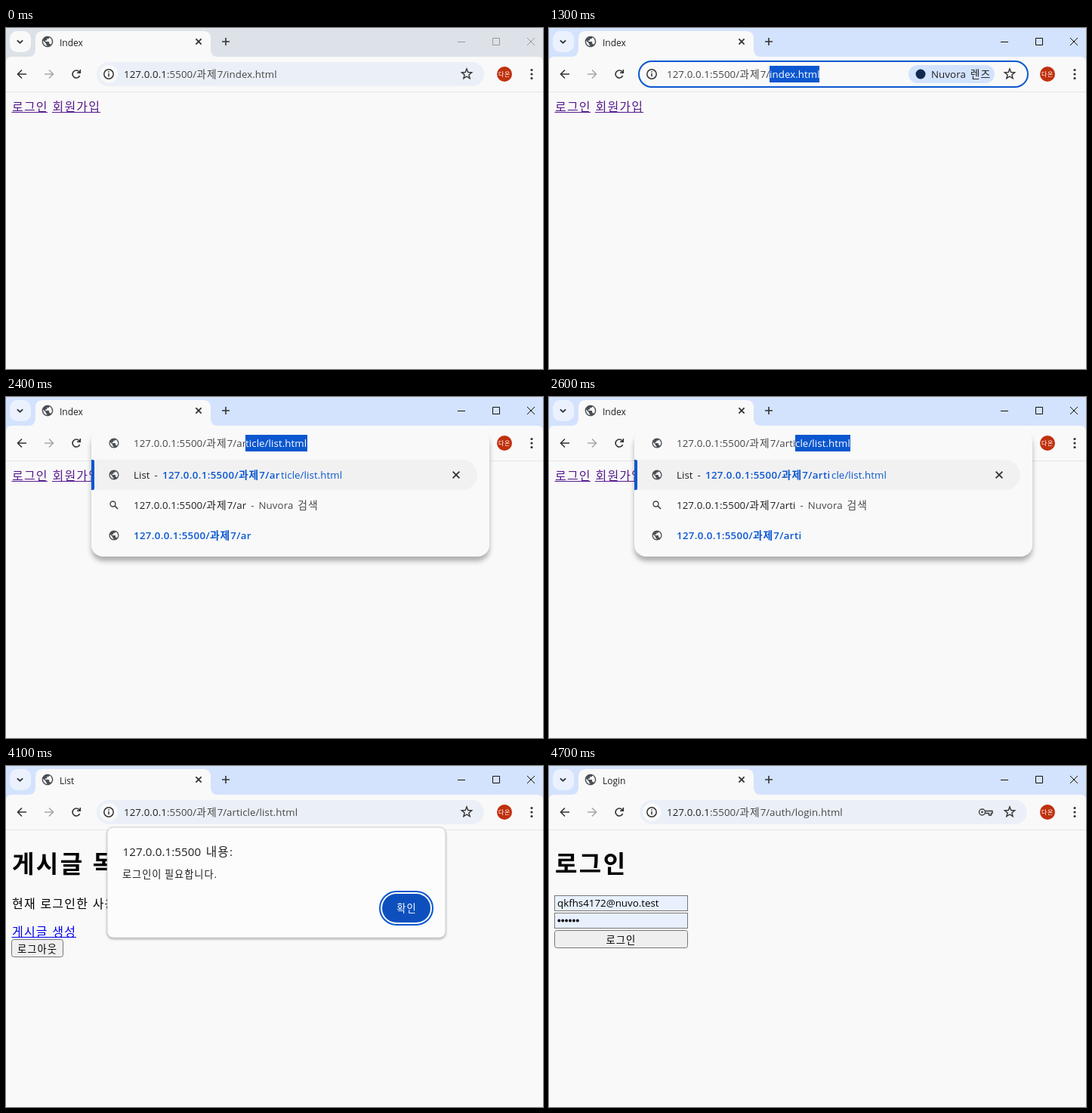
These frames come from a looping animation (711x451 px, 5800 ms). An HTML page:

```html
<!DOCTYPE html>
<html lang="ko">
<head>
<meta charset="utf-8">
<title>Login redirect</title>
<style>
  html, body { margin: 0; width: 100%; height: 100%; overflow: hidden; background: #f9f9f9; }
  svg { display: block; }
  text { font: 13.25px 'Open Sans', 'Noto Sans', 'Noto Sans CJK KR', sans-serif; fill: #1f1f1f; }
  .k { font-family: 'Noto Sans CJK KR', 'Noto Sans CJK', sans-serif; font-size: 1em; letter-spacing: .075em; }
  .u { word-spacing: 2.4px; letter-spacing: .1px; }
  .u .k { font-size: 1.04em; }
  .grey { fill: #474747; }
  .blue { fill: #0b57d0; }
  .white { fill: #fff; }
  .match { fill: #0b57d0; font-weight: 600; letter-spacing: .37px; }
  .page { font-size: 16px; fill: #000; word-spacing: 1.4px; }
  .head { font-size: 32px; font-weight: 700; fill: #000; word-spacing: 3px; }
  .ctl { font-size: 13.33px; fill: #000; }
  .mid { text-anchor: middle; }
  .tab { font-size: 12px; }
  .line { fill: none; stroke: #333; stroke-width: 1.6; }
</style>
</head>
<body>
<svg id="stage" width="711" height="451" viewBox="0 0 711 451"></svg>
<script>
const LOOP = 5800;
const BASE = '127.0.0.1:5500/과제7/';
const BLUE = '#0b57d0';
const GLOBE = 'M12 2C6.48 2 2 6.48 2 12s4.48 10 10 10 10-4.48 10-10S17.52 2 12 2zm-1 17.93c-3.95-.49-7-3.85-7-7.93 ' +
  '0-.62.08-1.21.21-1.79L9 15v1c0 1.1.9 2 2 2v1.93zm6.9-2.54c-.26-.81-1-1.39-1.9-1.39h-1v-3c0-.55-.45-1-1-1H8v-2h2' +
  'c.55 0 1-.45 1-1V7h2c1.1 0 2-.9 2-2v-.41c2.93 1.19 5 4.06 5 7.41 0 2.08-.8 3.97-2.1 5.39z';

// Times at which each part is visible
const shown = {
  barIdle: [[0, 1100]], barActive: [[1100, LOOP]],
  tabIndex: [[0, 3500]], tabList: [[3500, 4600]], tabLogin: [[4600, LOOP]],
  pill: [[0, 500], [4100, LOOP]], pillHover: [[500, 1100], [3500, 4100]], pillFocus: [[1100, 3500]],
  urlIndex: [[0, 1100]], urlList: [[3500, 4600]], urlLogin: [[4600, LOOP]],
  selNone: [[1100, 1200]], selPart: [[1200, 1300]], selFull: [[1300, 2100]],
  chip: [[1200, 2100]], key: [[4700, LOOP]],
  home: [[0, 3500]], list: [[3500, 4600]], login: [[4600, LOOP]], filled: [[4700, LOOP]],
  dropA: [[2100, 2400]], dropAr: [[2400, 2600]], dropArti: [[2600, 3500]],
  dialog: [[3500, 4600]],
};

// Dialog pose: start, opacity, vertical offset
const poses = [[3500, .33, -10], [3600, 1, 0], [4500, .33, -10]];

const group = (id, body) => `<g id="${id}">${body}</g>`;
const rect = (x, y, w, h, r, fill, extra = '') =>
  `<rect x="${x}" y="${y}" width="${w}" height="${h}" rx="${r}" fill="${fill}" ${extra}/>`;
const circle = (x, y, r, fill, extra = '') => `<circle cx="${x}" cy="${y}" r="${r}" fill="${fill}" ${extra}/>`;
const line = (d, extra = '') => `<path class="line" d="${d}" ${extra}/>`;
const text = (x, y, s, cls = '', style = '') =>
  `<text x="${x}" y="${y}" class="${cls}" style="${style}">` +
  s.replace(/[가-힣]+/g, '<tspan class="k">$&</tspan>') + '</text>';
const cross = (x, y, r, extra) => line(`M${x - r} ${y - r}l${2 * r} ${2 * r}m0 ${-2 * r}l${-2 * r} ${2 * r}`, extra);
const globe = (x, y, s) =>
  `<path d="${GLOBE}" fill="#4b4f54" transform="translate(${x} ${y}) scale(${s}) translate(-12 -12)"/>`;
const pick = (x, end, s) => rect(x, 50, end - x, 22, 0, BLUE) + text(x, 66, s, 'u white');

function titleBar(id, bg, button, ink) {
  const style = `style="stroke:${ink};stroke-width:1"`;
  return group(id,
    rect(0, 0, 711, 50, 0, bg) + rect(5, 4, 28, 28, 10, button) +
    line('M598 18.5h10M644.5 13.5h9v9h-9z', style) + cross(695, 18, 5, style));
}

function star(x, y) {
  let d = '';
  for (let i = 0; i < 10; i++) {
    const a = i * Math.PI / 5, r = i % 2 ? 3 : 7;
    d += `${i ? 'L' : 'M'}${x + r * Math.sin(a)} ${y - r * Math.cos(a)}`;
  }
  return line(d + 'z', 'style="stroke-width:1.4"');
}

function chrome() {
  const pill = (id, fill) => group(id, rect(120, 45, 513, 32, 16, fill) + circle(136, 61, 12, '#f9f9f9'));
  const tab = (id, s) => group(id, text(71, 23.5, s, 'tab'));
  const url = (id, tail) => group(id,
    text(156, 66, '127.0.0.1<tspan class="grey">' + BASE.slice(9) + '</tspan>', 'u') + text(292, 66, tail, 'u grey'));
  const base = text(156, 66, BASE, 'u grey');
  return titleBar('barIdle', '#dde1e8', '#f9f9f9', '#999') +
    titleBar('barActive', '#d3e2fd', '#ebf2fe', '#111') +
    '<path d="M0 85V45q0-7 7-7h22q10 0 10-10V14q0-10 10-10h212q10 0 10 10v14q0 10 10 10h423q7 0 7 7v40z" fill="#f9f9f9"/>' +
    rect(0, 84, 711, 1, 0, '#e4e6e9') +
    line('M14.8 16.3l3.7 3.4 3.7-3.4', 'style="stroke-width:1.8"') +
    globe(55, 18, .73) + cross(255, 18, 3.6, 'style="stroke-width:1.8"') +
    line('M286 18h10M291 13v10') +
    tab('tabIndex', 'Index') + tab('tabList', 'List') + tab('tabLogin', 'Login') +
    line('M27 61H15.7M21 55.5L15.5 61l5.5 5.5') +
    line('M51 61h11.3M57 55.5l5.5 5.5-5.5 5.5', 'style="stroke:#a8a8a8"') +
    line('M97.6 63.2a5 5 0 1 1-1-5.7l1.4 1.6M98.3 55v4.3h-4.3') +
    pill('pill', '#ebf0f8') + pill('pillHover', '#e5ecf6') +
    group('pillFocus', rect(119, 44, 515, 34, 17, '#f9f9f9', `stroke="${BLUE}" stroke-width="2"`)) +
    circle(136, 61, 6.2, 'none', 'stroke="#333" stroke-width="1.5"') +
    line('M136 60v4.2M136 57.2v1.6', 'style="stroke-width:1.5"') +
    url('urlIndex', 'index.html') + url('urlList', 'article/list.html') + url('urlLogin', 'auth/login.html') +
    group('selNone', base + text(292, 66, 'index.html', 'u grey')) +
    group('selPart', base + text(292, 66, 'index', 'u grey') + pick(326, 358, '.html')) +
    group('selFull', base + pick(292, 358, 'index.html')) +
    group('chip', rect(476, 49, 114, 24, 12, '#d3e3fd') + circle(492, 61, 6.5, '#12294f') + text(506, 66, 'Nuvora 렌즈', 'u')) +
    group('key', circle(573.5, 61, 4, 'none', 'stroke="#444" stroke-width="1.5"') + circle(573.5, 61, 1.4, '#444') +
      line('M577.4 59.5H587v3h-1.5v2.5h-3v-2.5h-5.1', 'style="stroke-width:1.4"')) +
    star(610, 61) + circle(660, 61, 10, '#c0310e') + text(660, 64, '다온', 'mid white', 'font-size:8px') +
    [55.5, 61, 66.5].map(y => circle(696, y, 1.6, '#333')).join('');
}

function link(x, end, y, s, color) {
  return text(x, y, s, 'page', `fill:${color}`) + rect(x - .5, y + 1, end - x + .5, 1, 0, color);
}

function button(x, y, w, s) {
  return rect(x + .5, y + .5, w - 1, 23, 3, '#efefef', 'stroke="#767676"') + text(x + w / 2, y + 17.5, s, 'ctl mid');
}

function pages() {
  const field = (y, fill) => rect(7.5, y + .5, 176, 20, 0, fill, 'stroke="#767676"');
  const dots = [...Array(6).keys()].map(i => circle(13.3 + i * 4.9, 204.5, 1.9, '#000')).join('');
  return group('home', link(8, 55, 110, '로그인', '#551a8b') + link(61.5, 125, 110, '회원가입', '#551a8b')) +
    group('list', text(8, 140.5, '게시글 목록', 'head') + text(8, 188, '현재 로그인한 사용자:', 'page') +
      link(8, 93, 225, '게시글 생성', '#0000ee') + button(7, 229, 69, '로그아웃')) +
    group('login', text(8, 140.5, '로그인', 'head') + field(171, '#fff') + field(194, '#fff') + button(7, 217, 177, '로그인')) +
    group('filled', field(171, '#e8f0fe') + field(194, '#e8f0fe') + text(11, 186, 'qkfhs4172@nuvo.test', 'ctl') + dots);
}

// Suggestion list for a typed prefix; boldWidth is where plain text resumes
function dropdown(id, typed, selX, boldWidth, entries) {
  const tail = 'article/list.html'.slice(typed.length);
  const hit = (x, y, rest = '') =>
    text(x, y, BASE + typed, 'u match') + (rest && text(x + boldWidth, y, rest, 'u blue'));
  let rows = '';
  entries.forEach(([title, x, rest], i) => {
    const y = 183 + i * 40;
    rows += globe(143, y, .65) + (title && text(169, y + 5, title + ' -', 'u')) + hit(x, y + 5, rest);
  });
  return group(id,
    rect(113, 43, 527, 128 + entries.length * 40, 16, '#f9f9f9', 'filter="url(#shade)"') +
    globe(143, 61, .65) + text(169, 66, BASE + typed, 'u grey') + pick(selX, 399, tail) +
    '<path d="M113 83h491a20 20 0 0 1 0 40H113z" fill="#f1f1f1"/>' +
    `<path d="M113 83h2q2 0 2 2v36q0 2-2 2h-2z" fill="${BLUE}"/>` +
    globe(143, 103, .65) + text(169, 108, 'List -', 'u') + hit(207, 108, tail) + cross(596, 103, 4.4, 'style="stroke-width:1.8"') +
    circle(141.5, 141.5, 3.5, 'none', 'stroke="#444" stroke-width="1.4"') + line('M144 144l4 4') +
    text(169, 148, `${BASE + typed}<tspan class="grey"> - Nuvora 검색</tspan>`, 'u') + rows);
}

function dialog() {
  return group('dialog',
    rect(134, 81, 448, 146, 8, '#fcfcfc', 'stroke="#c4c4c4" stroke-width=".8" filter="url(#soft)"') +
    text(154.5, 119, '127.0.0.1:5500 내용:', 'u', 'font-size:15.1px') +
    text(154, 148, '로그인이 필요합니다.', '', 'font-size:13.2px') +
    rect(495, 166, 70, 44, 22, '#fff', `stroke="${BLUE}" stroke-width="2"`) +
    rect(498, 169, 64, 38, 19, '#0d50bd') + text(530.5, 193, '확인', 'mid white'));
}

const shadow = (id, dy, blur, alpha) =>
  `<filter id="${id}" x="-10%" y="-10%" width="120%" height="125%">` +
  `<feDropShadow dx="0" dy="${dy}" stdDeviation="${blur}" flood-color="#000" flood-opacity="${alpha}"/></filter>`;

const bare = [['', 169, '']];
document.getElementById('stage').innerHTML =
  shadow('shade', 6, 3, .3) + shadow('soft', 1.5, 1.5, .35) +
  rect(0, 0, 711, 451, 0, '#f9f9f9') + chrome() + pages() +
  dropdown('dropA', 'a', 312, 151, [['Sign up', 234, 'uth/signup.html'], ['Login', 221, 'uth/login.html'], ...bare]) +
  dropdown('dropAr', 'ar', 317, 157, bare) +
  dropdown('dropArti', 'arti', 326, 167, bare) + dialog();

const parts = Object.entries(shown).map(([id, spans]) => [document.getElementById(id), spans]);
const box = document.getElementById('dialog');

function draw() {
  const t = performance.now() % LOOP;
  for (const [node, spans] of parts) {
    node.style.display = spans.some(([a, b]) => t >= a && t < b) ? '' : 'none';
  }
  const [, alpha, dy] = poses.filter(p => p[0] <= t).pop() || poses[0];
  box.setAttribute('opacity', alpha);
  box.setAttribute('transform', `translate(0 ${dy})`);
  requestAnimationFrame(draw);
}
draw();
</script>
</body>
</html>
```
